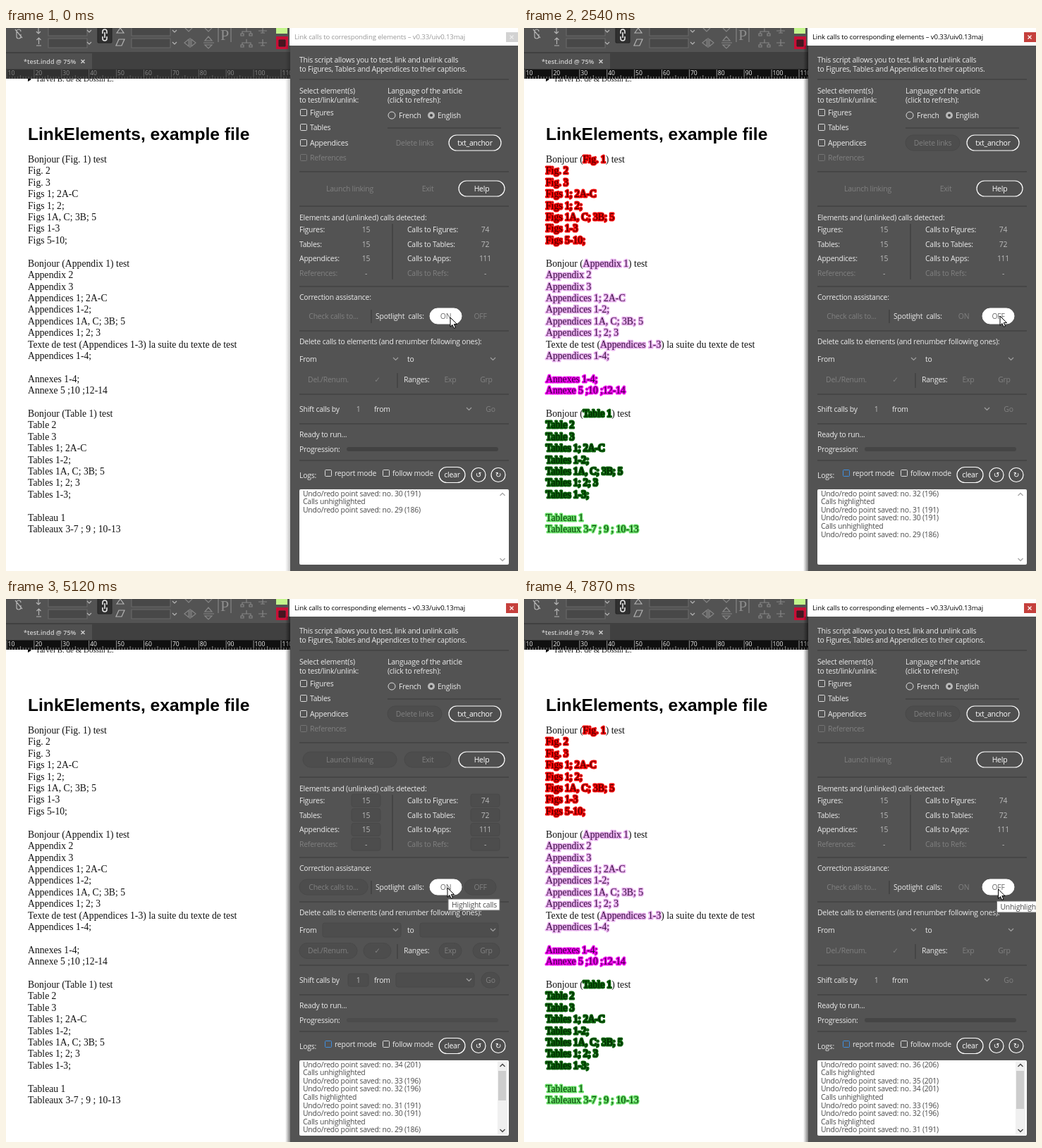
These frames come from a looping animation (726x771 px, 8 s). An HTML page:

```html
<!DOCTYPE html>
<html lang="en">
<head>
<meta charset="utf-8">
<title>Spotlight calls</title>
<style>
html, body { margin: 0; width: 100%; height: 100%; overflow: hidden; background: #fff; }
svg { display: block; width: 726px; height: 771px; }
text { white-space: pre; }
.ui text, .tip text { font: 10.4px "Open Sans", "Noto Sans", sans-serif; letter-spacing: -.2px; fill: #ececec; }
.mid { text-anchor: middle; }
.ui .dim, .ui .dead text { fill: #808080; }
.ui .val text { fill: #bcbcbc; }
.line { stroke: #434343; stroke-width: 1.6; }
.box { fill: none; stroke: #dcdcdc; }
.box.faint { stroke: #747474; }
.live rect { fill: #4f4f4f; stroke: #fff; stroke-width: 1.2; }
.live text { fill: #fff; }
.hot rect { fill: #fff; stroke: #fff; }
.ui .hot text { fill: #686868; }
.dead rect, .val rect { fill: none; }
.pills .dead rect, .pills .val rect, .active .del rect { fill: #4d4d4d; stroke: #494949; }
.chev { fill: none; stroke: #a0a0a0; stroke-width: 1.2; }
.bar { fill: #424242; }
.active .bar { fill: #454545; }
.pills .bar { fill: #4c4c4c; }
.ui .title { font-size: 9.6px; letter-spacing: -.13px; fill: #999; }
.active .title { fill: #000; }
.close rect { fill: #d2d2d2; }
.active .close rect { fill: #c5403c; }
.close path { fill: none; stroke: #eee; stroke-width: 1.1; }
.active .close path { stroke: #fff; }
.active .focus { stroke: #3f8fe0; }
.shade { opacity: .45; }
.active .shade { opacity: 1; }
.ui .log text { fill: #4a4a4a; }
.arrows path { fill: none; stroke: #a8a8a8; stroke-width: 1.4; }
.scroll .arrows path { stroke: #444; }
.track, .thumb { visibility: hidden; }
.scroll .track, .scroll .thumb { visibility: visible; }
.ruler rect { fill: #303030; }
.ruler path { stroke: #6e6e6e; stroke-width: .8; }
.ruler text { font: 8.6px "Open Sans", "Noto Sans", sans-serif; fill: #8c8c8c; }
.bright .ruler rect { fill: #101010; }
.bright .ruler path { stroke: #b8b8b8; }
.bright .ruler text { fill: #f2f2f2; }
.doc text { font: 13.7px "Liberation Serif", "Times New Roman", serif; fill: #111; }
.doc .head { font: bold 24.6px "Liberation Sans", Arial, sans-serif; fill: #000; }
.doc .ref { font-size: 11px; }
.doc tspan { paint-order: stroke; stroke-linejoin: round; stroke-width: 3.2px; }
.figOn .fig { stroke: #f50000; fill: #3c0000; }
.restOn .app { stroke: #e8b0ee; fill: #3c1244; }
.restOn .annex { stroke: #f000f0; fill: #3a003e; }
.restOn .table { stroke: #0b640b; fill: #001c00; }
.restOn .tableau { stroke: #66df66; fill: #063a06; }
.tip rect { fill: #fff; stroke: #707070; }
.ui ~ .tip text { fill: #4c4c4c; }
.icons { fill: none; stroke: #b4b4b4; stroke-width: 1.2; }
.icons .field { fill: #484848; stroke: #686868; }
.icons .off { stroke: #858585; }
</style>
</head>
<body>
<svg id="stage" viewBox="0 0 726 771">
  <defs>
    <linearGradient id="edge"><stop offset="0" stop-opacity="0"/><stop offset="1" stop-opacity=".5"/></linearGradient>
    <clipPath id="page"><rect y="72" width="403" height="699"/></clipPath>
    <clipPath id="logClip"><rect x="417" y="656" width="280" height="105"/></clipPath>
  </defs>
  <g class="doc" id="doc" clip-path="url(#page)">
    <rect y="72" width="403" height="699" fill="#fff"/>
    <path d="M31 70l5 3-5 3z"/>
    <text class="ref" x="42" y="76">Tarvel B. de &amp; Dossin L.</text>
    <text class="head" x="31" y="159">LinkElements, example file</text>
  </g>
  <rect width="403" height="35" fill="#535353"/>
  <g class="icons">
    <path d="M15 9v-4a3 3 0 0 1 6 0M15 9v3a3 3 0 0 0 6 0V9M13 2l10 12"/>
    <path d="M46 0v8m-3-3l3 3 3-3M43 25h7m-3.500-2v-9m-3 3l3-3 3 3"/>
    <path class="field" d="M60 -2h55v13H60zM60 15h55v13H60zM178 -2h55v13h-55zM178 15h55v13h-55z"/>
    <path d="M115 3l3 3 3-3M115 20l3 3 3-3M236 3l3 3 3-3M236 20l3 3 3-3"/>
    <rect x="130" y="-2" width="20" height="23" rx="2" fill="#303030" stroke="#252525"/>
    <path d="M137 8V5a3 3 0 0 1 6 0v3M137 12v3a3 3 0 0 0 6 0v-3M140 6v8" stroke="#e8e8e8" stroke-width="1.6"/>
    <path d="M157 7l5-7 5 7zM160 16h8l-4 9h-8z"/>
    <path class="off" d="M261 14v14M259 16v10l-6-5zM263 16v10l6-5zM280 21h15M282 18h10l-5-6zM282 24h10l-5 5zM254 0l5 5 5-5M282 0l5 5 5-5M301 0v20M319 0v20"/>
    <path class="off" d="M341 0v5M335 8V5h12v3M341 16v5M335 24v-3h12v3M364 0v7M358 4h12M364 16v9M358 21h12"/>
    <path class="off" d="M333 8h4v3h-4zM345 8h4v3h-4zM333 24h4v3h-4zM345 24h4v3h-4zM361 7h6M361 25h6"/>
  </g>
  <text x="310" y="17" class="mid" style="font:22px 'Liberation Serif',serif" fill="#8d8d8d">P</text>
  <path d="M383 0h16v8h-16z" fill="#c3f58c"/>
  <path d="M383 12h17v18h-17z" fill="#c90f36"/>
  <path d="M387 17h9v9h-9z" fill="#4a1420" stroke="#222"/>
  <rect y="34" width="403" height="25" fill="#404040"/>
  <rect y="36" width="122" height="23" fill="#505050"/>
  <text x="25" y="51" style="font:600 9px 'Open Sans','Noto Sans',sans-serif" fill="#cfcfcf">*test.indd @ 75%</text>
  <path d="M106.500 45l5 5m0-5l-5 5" stroke="#cfcfcf" stroke-width="1.400"/>
  <g class="ruler" id="ruler"><rect y="58.500" width="403" height="13.500"/></g>
  <rect class="shade" x="396" y="25" width="7" height="746" fill="url(#edge)"/>
  <g class="ui" id="ui">
    <rect x="403" width="323" height="771" fill="#535353"/>
    <rect x="402" width="324" height="25" fill="#fff"/>
    <g class="close"><rect x="709" y="6" width="17" height="14"/><path d="M714.500 10.500l5 5m0-5l-5 5"/></g>
    <path class="line" d="M416 73H713M541 142H702M416 204H713M416 253H713M416 367H713M416 430H713M416 520H713M416 562H713M416 614H713M548 278V357M518 400V419M555 490V511"/>
    <path class="chev" d="M549 468l3.500 3.500 3.500-3.500M687 468l3.500 3.500 3.500-3.500M653 539l3.500 3.500 3.500-3.500"/>
    <circle cx="547" cy="124" r="5" class="box"/>
    <circle cx="603" cy="124" r="5" fill="#b9b9b9"/><circle cx="603" cy="124" r="2" fill="#444"/>
    <rect class="bar" x="483" y="595" width="215" height="6" rx="3"/>
    <rect x="416" y="655" width="297" height="107" rx="2" fill="#fff"/>
    <rect class="track" x="697" y="656" width="14" height="105" fill="#f0f0f0"/>
    <rect class="thumb" id="thumb" x="698" y="670" width="11" height="42" fill="#cdcdcd"/>
    <g class="arrows"><path d="M700.500 664l3.500-3.500 3.500 3.500M700.500 753l3.500 3.500 3.500-3.500"/></g>
    <g class="log" clip-path="url(#logClip)"><g id="log"></g></g>
  </g>
  <g class="tip" id="tip"><rect height="16"/><text x="5" y="11.500"></text></g>
  <path id="cursor" d="M0 0V13.300l3-2.800 2.200 4.800 2.300-1-2.200-4.700H9.500z" stroke-width="1"/>
</svg>
<script>
const $ = id => document.getElementById(id);
const stage = $('stage'), ui = $('ui');

function add(parent, tag, attrs, text) {
  const node = document.createElementNS('http://www.w3.org/2000/svg', tag);
  for (const key in attrs) node.setAttribute(key, attrs[key]);
  if (text !== undefined) node.textContent = text;
  return parent.appendChild(node);
}

// Document text: calls stand in brackets or fill the line
const lines = [
  ...['Bonjour (Fig. 1) test', 'Fig. 2', 'Fig. 3', 'Figs 1; 2A-C', 'Figs 1; 2;', 'Figs 1A, C; 3B; 5', 'Figs 1-3', 'Figs 5-10;', ''].map(s => ['fig', s]),
  ...['Bonjour (Appendix 1) test', 'Appendix 2', 'Appendix 3', 'Appendices 1; 2A-C', 'Appendices 1-2;', 'Appendices 1A, C; 3B; 5', 'Appendices 1; 2; 3', 'Texte de test (Appendices 1-3) la suite du texte de test', 'Appendices 1-4;', ''].map(s => ['app', s]),
  ...['Annexes 1-4;', 'Annexe 5 ;10 ;12-14', ''].map(s => ['annex', s]),
  ...['Bonjour (Table 1) test', 'Table 2', 'Table 3', 'Tables 1; 2A-C', 'Tables 1-2;', 'Tables 1A, C; 3B; 5', 'Tables 1; 2; 3', 'Tables 1-3;', ''].map(s => ['table', s]),
  ...['Tableau 1', 'Tableaux 3-7 ; 9 ; 10-13'].map(s => ['tableau', s])
];
lines.forEach(([kind, line], i) => {
  const [, before, call, after] = line.match(/^(.*\()(.*)(\).*)$/) || ['', '', line, ''];
  const text = add($('doc'), 'text', { x: 31, y: 191 + 16.41 * i }, before);
  add(text, 'tspan', { class: kind }, call);
  text.append(after);
});

// Ruler
let ticks = '';
for (let i = 0; i < 104; i++) {
  const height = i % 10 ? (i % 5 ? 3 : 5) : 13;
  ticks += `M${(1 + i * 3.89).toFixed(1)} 72v-${height}`;
}
add($('ruler'), 'path', { d: ticks });
for (let i = 0; i < 11; i++) add($('ruler'), 'text', { x: 2.5 + i * 38.9, y: 67 }, 10 * (i + 1));

// Panel
const label = (x, y, text, cls = '') => add(ui, 'text', { x, y: y + 3.8, class: cls }, text);

function pill(x1, x2, y, text, cls, height = 22, radius = height / 2) {
  const g = add(ui, 'g', { class: cls });
  add(g, 'rect', { x: x1, y: y - height / 2, width: x2 - x1, height, rx: radius });
  add(g, 'text', { x: (x1 + x2) / 2, y: y + 3.8, class: 'mid' }, text);
  return g;
}

function check(x, y, text, cls = '', textCls = '') {
  add(ui, 'rect', { x: x + .5, y: y - 4.5, width: 9, height: 9, rx: 1, class: 'box ' + cls });
  label(x + 14, y, text, textCls);
}

label(409, 12, 'Link calls to corresponding elements – v0.33/uiv0.13maj', 'title');
label(416, 45, 'This script allows you to test, link and unlink calls');
label(416, 58, 'to Figures, Tables and Appendices to their captions.');
label(416, 89, 'Select element(s)');
label(416, 102, 'to test/link/unlink:');
label(541, 89, 'Language of the article');
label(541, 102, '(click to refresh):');
check(417, 120, 'Figures');
check(417, 141, 'Tables');
check(417, 163, 'Appendices');
check(417, 184, 'References', 'faint', 'dim');
label(557, 124, 'French');
label(612, 124, 'English');
pill(541, 618, 163, 'Delete links', 'dead del');
pill(628, 702, 163, 'txt_anchor', 'live');
pill(421, 554, 228, 'Launch linking', 'dead');
pill(565, 631, 228, 'Exit', 'dead');
pill(642, 707, 228, 'Help', 'live');
label(416, 269, 'Elements and (unlinked) calls detected:');
[['Figures:', 15, 'Calls to Figures:', 74], ['Tables:', 15, 'Calls to Tables:', 72],
 ['Appendices:', 15, 'Calls to Apps:', 111], ['References:', '-', 'Calls to Refs:', '-']].forEach((row, i) => {
  const y = 286 + 20.7 * i, cls = i === 3 ? 'dim' : '';
  label(416, y, row[0], cls);
  label(569, y, row[2], cls);
  pill(490, 531, y, row[1], 'val', 18, 3);
  pill(659, 700, y, row[3], 'val', 18, 3);
});
label(416, 382.5, 'Correction assistance:');
pill(416, 513, 409, 'Check calls to...', 'dead');
label(524, 409, 'Spotlight  calls:');
const onButton = pill(601, 646, 409, 'ON');
const offButton = pill(650, 695, 409, 'OFF');
label(416, 445, 'Delete calls to elements (and renumber following ones):');
label(416, 470, 'From');
label(569, 470, 'to');
pill(416, 498, 499.5, 'Del./Renum.', 'dead');
pill(507, 546, 499.5, '✓', 'dead');
label(564, 499.5, 'Ranges:');
pill(614, 646, 499.5, 'Exp', 'dead');
pill(662, 700, 499.5, 'Grp', 'dead');
label(416, 541, 'Shift calls by');
pill(485, 514, 541, '1', 'val', 18, 3);
label(522, 541, 'from');
pill(674, 700, 541, 'Go', 'dead');
[[449, 470], [587, 470], [553, 541]].forEach(([x, y]) =>
  ui.insertBefore(pill(x, x + 111, y, '', 'dead', 20, 3), ui.querySelector('.chev')));
label(416, 577, 'Ready to run...');
label(416, 598, 'Progression:');
label(416, 635, 'Logs:');
check(452, 632, 'report mode', 'focus');
check(534, 632, 'follow mode');
pill(614, 651, 634.5, 'clear', 'live');
pill(660, 680, 634.5, '↺', 'live', 20);
pill(688, 708, 634.5, '↻', 'live', 20);

// Log, newest entry first
const save = (no, size) => `Undo/redo point saved: no. ${no} (${size})`;
const lit = 'Calls highlighted', unlit = 'Calls unhighlighted';
const entries = [save(36, 206), lit, save(35, 201), save(34, 201), unlit, save(33, 196),
  save(32, 196), lit, save(31, 191), save(30, 191), unlit, save(29, 186)];
const rows = entries.map((_, i) => add($('log'), 'text', { x: 421, y: 664.8 + 11.55 * i }));

// Time, pointer x and y, and what changes then
const steps = [
  [0, 630, 411, { on: 'hot', off: 'dead', first: 9, tip: '' }],
  [430, 629, 411],
  [580, 629, 411, { active: 1 }],
  [730, 629, 411, { bright: 1 }],
  [850, 625, 410], [970, 621, 409], [1090, 618, 408],
  [1340, 618, 408, { on: 'live', first: 8 }],
  [1630, 618, 408, { on: 'dead', off: 'live', first: 6, figOn: 1, restOn: 1 }],
  [1890, 646, 407],
  [2010, 692, 406, { off: 'hot' }],
  [2130, 684, 402], [2270, 680, 404], [2420, 677, 407], [2540, 675, 409],
  [2690, 675, 409, { tip: 'Unhighlight calls', tipX: 675, tipY: 428 }],
  [3540, 674, 408, { tip: '', dark: 1 }],
  [3790, 676, 409, { off: 'live', first: 5, figOn: 0, pills: 1, dark: 0 }],
  [3940, 672, 409],
  [4090, 657, 410, { on: 'live', off: 'dead', first: 3, restOn: 0, scroll: 1 }],
  [4210, 646, 409],
  [4360, 640, 409, { on: 'hot' }],
  [4480, 633, 409], [4600, 628, 408], [4720, 625, 409],
  [5000, 625, 409, { tip: 'Highlight calls', tipX: 627, tipY: 426 }],
  [5120, 626, 410],
  [5680, 626, 409, { on: 'live', first: 2, tip: '' }],
  [5840, 626, 409, { figOn: 1, pills: 0 }],
  [5960, 626, 409, { on: 'dead', off: 'live', first: 0, restOn: 1 }],
  [6210, 628, 409], [6360, 633, 409], [6480, 640, 409], [6630, 646, 409],
  [6750, 651, 410, { off: 'hot' }],
  [7170, 662, 411], [7290, 670, 411],
  [7570, 670, 411, { tip: 'Unhighlight calls', tipX: 670.5, tipY: 429 }],
  [7870, 672.5, 412]
];
const flags = ['active', 'bright', 'figOn', 'restOn', 'pills', 'scroll'];

function show(index) {
  const state = Object.assign({}, ...steps.slice(0, index + 1).map(step => step[3]));
  const [, x, y] = steps[index];
  stage.setAttribute('class', flags.filter(flag => state[flag]).join(' '));
  onButton.setAttribute('class', state.on);
  offButton.setAttribute('class', state.off);
  rows.forEach((row, i) => { row.textContent = entries[state.first + i] || ''; });
  $('thumb').setAttribute('height', state.first < 3 ? 54 : 42);

  const tip = $('tip');
  tip.setAttribute('visibility', state.tip ? 'visible' : 'hidden');
  tip.setAttribute('transform', `translate(${state.tipX || 0} ${state.tipY || 0})`);
  tip.firstChild.setAttribute('width', state.tip.length > 15 ? 84 : 73);
  tip.lastChild.textContent = state.tip;

  const cursor = $('cursor');
  cursor.setAttribute('transform', `translate(${x} ${y})`);
  cursor.setAttribute('fill', state.dark ? '#000' : '#fff');
  cursor.setAttribute('stroke', '#000');
}

const start = performance.now();
let current = -1;
function tick() {
  const time = (performance.now() - start) % 8000;
  const index = steps.filter(step => step[0] <= time).length - 1;
  if (index !== current) show(current = index);
  requestAnimationFrame(tick);
}
tick();
</script>
</body>
</html>
```
